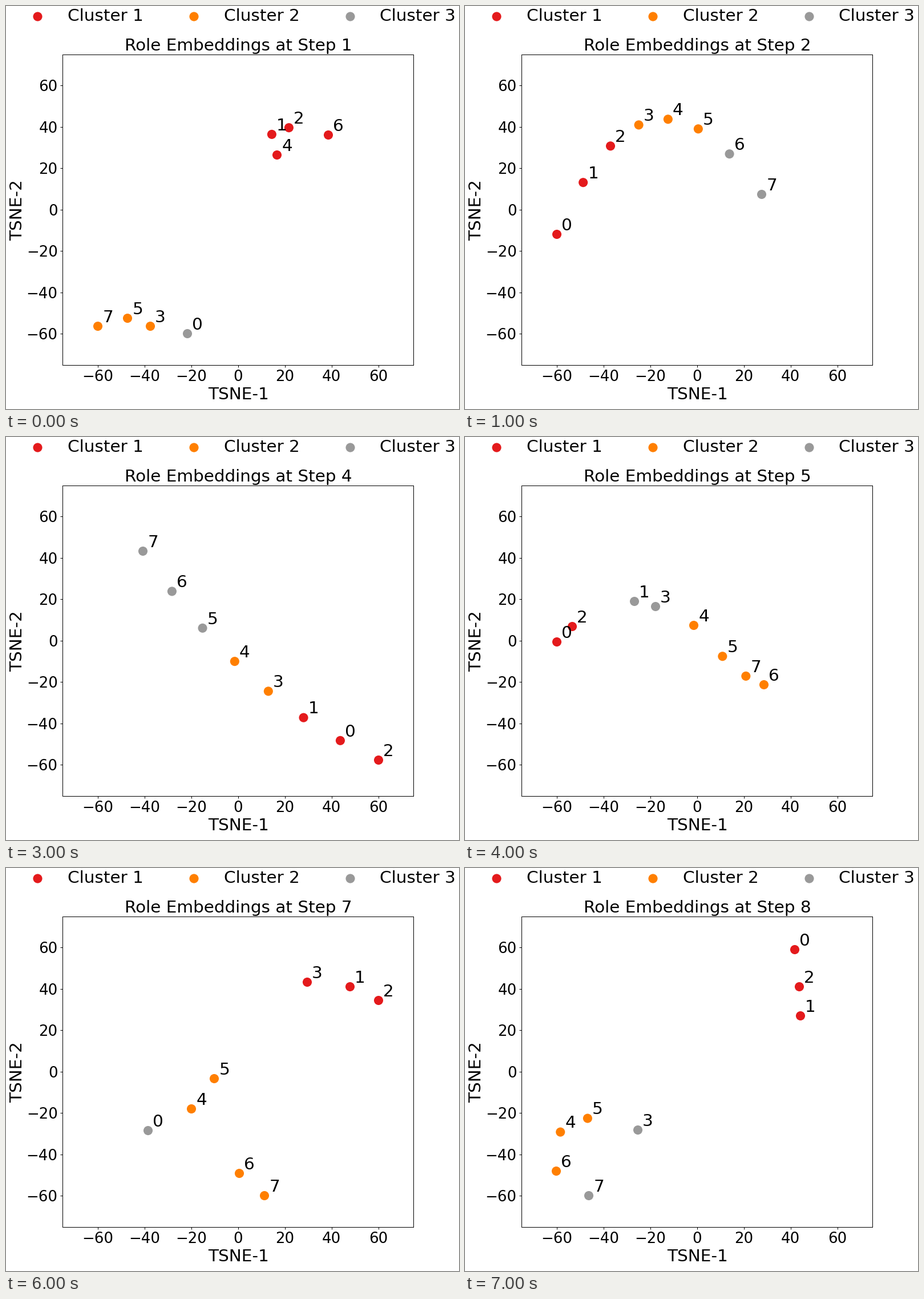
A matplotlib script that plays this animation: 794 by 706 pixels, repeating every 8000 ms.

```python
import numpy as np
import matplotlib.pyplot as plt
from matplotlib.animation import FuncAnimation

W, H, DPI = 794, 706, 64
LEFT, RIGHT, TOP, BOTTOM = 99.3, 714.3, 85, 628.7
COLORS = {"r": "#e41a1c", "o": "#ff7f00", "g": "#999999"}
TEXT_PX, TICK_PX, DOT_PX = 29.45, 26, 16.1

# Each step is a set of arcs: cluster colours, the roles along the arc
# and the stage points it passes through
STEPS = [
    [("r", "4126", (475, 261), (476, 216), (565, 226)),
     ("o", "753", (161, 561), (213, 547), (253, 561)),
     ("g", "0", (318, 574))],
    [("rrrooogg", "01234567", (161, 400), (330, 200), (520, 330))],
    [("g", "210", (226, 139), (249, 212), (378, 185)),
     ("o", "435", (300, 271), (318, 365)),
     ("r", "67", (351, 503), (382, 541))],
    [("rrrooggg", "20134567", (653, 566), (430, 420), (240, 200))],
    [("r", "02", (161, 359), (188, 332)),
     ("g", "13", (297, 288), (334, 297)),
     ("o", "4576", (401, 330), (473, 404), (524, 434))],
    [("r", "56", (308, 175), (400, 139)),
     ("r", "74", (419, 182), (497, 217)),
     ("og", "0213", (519, 460), (414, 517), (307, 552))],
    [("r", "312", (528, 200), (603, 208), (653, 232)),
     ("goo", "045", (249, 460), (325, 422), (365, 369)),
     ("o", "67", (409, 535), (453, 574))],
    [("r", "021", (578, 143), (586, 208), (588, 259)),
     ("ooog", "6453", (160, 531), (186, 445), (303, 459)),
     ("g", "7", (217, 574))],
]


def pt(px):
    return px * 72 / DPI


def spread(keys, n):
    """Place n points evenly along the polynomial through the key points."""
    k = len(keys)
    curve = np.polyfit(np.linspace(0, 1, k), np.array(keys), k - 1)
    return np.vander(np.linspace(0, 1, n), k) @ curve


plt.rcParams["font.family"] = "DejaVu Sans"
fig = plt.figure(figsize=(W / DPI, H / DPI), dpi=DPI, facecolor="white")

ax = fig.add_axes([LEFT / W, 1 - BOTTOM / H,
                   (RIGHT - LEFT) / W, (BOTTOM - TOP) / H])
ticks = range(-60, 61, 20)
ax.set(xlim=(-75, 75), ylim=(-75, 75), xticks=ticks, yticks=ticks)
ax.tick_params(labelsize=pt(TICK_PX), length=pt(4.4), pad=pt(4.2), width=pt(1))
for spine in ax.spines.values():
    spine.set_linewidth(pt(1))

# Transparent layer in stage pixels
stage = fig.add_axes([0, 0, 1, 1])
stage.set(xlim=(0, W), ylim=(H, 0))
stage.axis("off")


def write(x, y, s, **kw):
    style = dict(fontsize=pt(TEXT_PX), va="baseline") | kw
    return stage.text(x, y, s, **style)


def dots(x, y, colors):
    return stage.scatter(x, y, s=pt(DOT_PX) ** 2, c=colors, linewidths=0)


for k, color in enumerate(COLORS.values()):
    x = 55.3 + 273.7 * k
    dots(x, 17.8, color)
    write(x + 52.8, 26, f"Cluster {k + 1}")

title = write(407, 78, "", ha="center")
write(407.5, 689.4, "TSNE-1", ha="center")
write(34, 357.5, "TSNE-2", ha="right", va="center", rotation=90)

points = dots(np.zeros(8), np.zeros(8), ["k"] * 8)
labels = [write(0, 0, str(k)) for k in range(8)]


def draw(i):
    spots, fills = np.zeros((8, 2)), [""] * 8
    for colors, roles, *keys in STEPS[i]:
        n = len(roles)
        for k, spot in enumerate(spread(keys, n)):
            role = int(roles[k])
            spots[role] = spot
            fills[role] = COLORS[colors[k * len(colors) // n]]
    points.set_offsets(spots)
    points.set_facecolors(fills)
    for label, (x, y) in zip(labels, spots):
        label.set_position((x + 8.2, y - 7.2))
    title.set_text(f"Role Embeddings at Step {i + 1}")
    return [points, title, *labels]


anim = FuncAnimation(fig, draw, frames=len(STEPS), interval=1000,
                     repeat=True, repeat_delay=0, blit=False)
plt.show()
```
